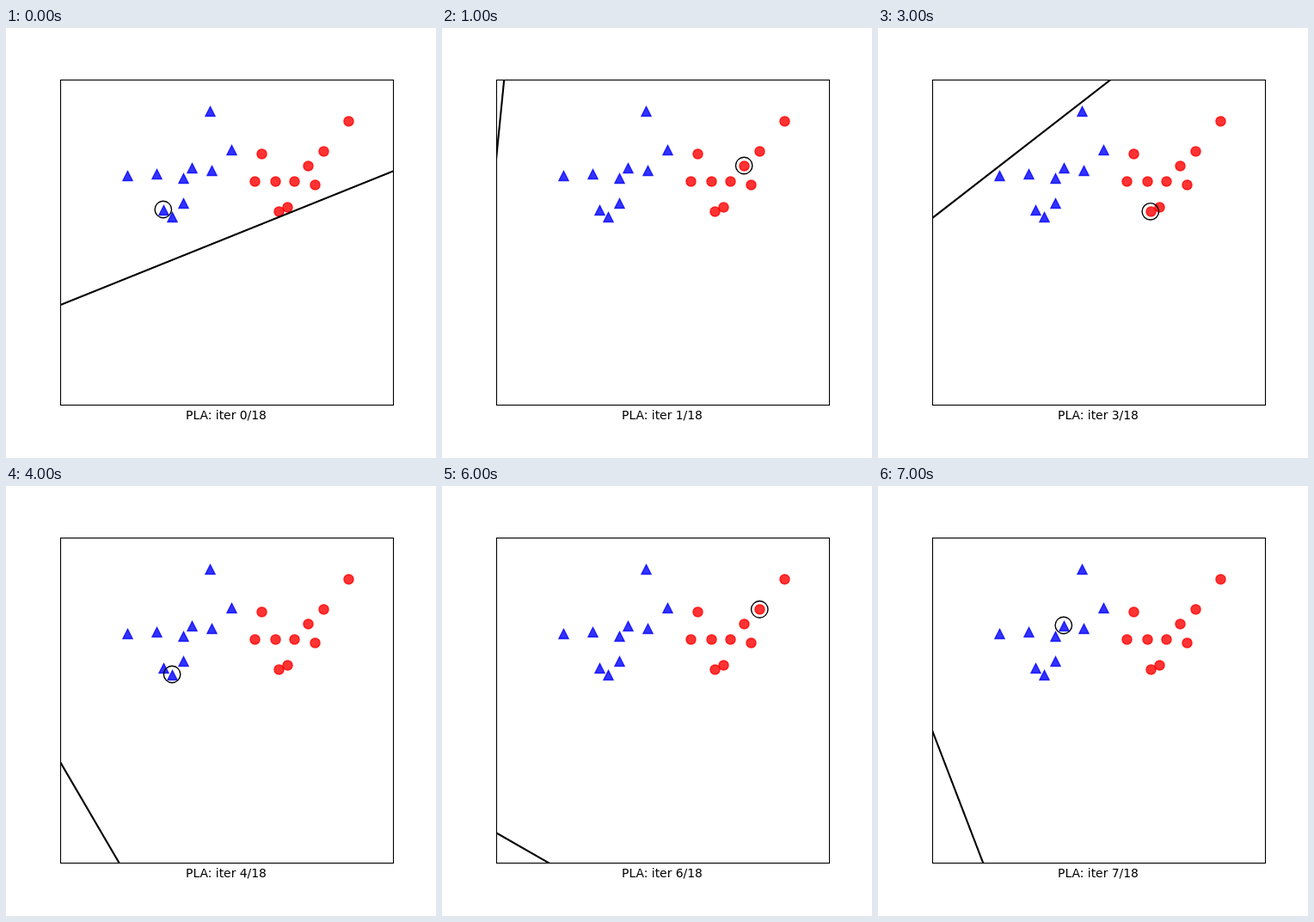
An HTML page for the animation above (8000 ms loop, 500x500 px).

```html
<!DOCTYPE html>
<html lang="en">
<head>
<meta charset="utf-8">
<title>Perceptron steps</title>
<style>
html, body { margin: 0; width: 100%; height: 100%; overflow: hidden; background: #fff; }
svg { display: block; width: 500px; height: 500px; }
text { font: 13.89px "DejaVu Sans", sans-serif; text-anchor: middle; }
</style>
</head>
<body>
<svg viewBox="0 0 500 500">
  <defs>
    <clipPath id="plot"><rect x="63.5" y="60.5" width="387" height="378"/></clipPath>
    <path id="tri" d="M0-5.56L5.56 5.56H-5.56Z" stroke-linejoin="miter"/>
    <circle id="dot" r="5.56"/>
  </defs>
  <g id="blue" fill="#00f" stroke="#00f" stroke-width="1.39" fill-opacity=".8" stroke-opacity=".8"></g>
  <g id="red" fill="#f00" stroke="#f00" stroke-width="1.39" fill-opacity=".8" stroke-opacity=".8"></g>
  <g clip-path="url(#plot)"><line id="edge" stroke="#000" stroke-width="2.08"/></g>
  <circle id="ring" r="9.72" fill="none" stroke="#000" stroke-width="1.39"/>
  <rect x="63.5" y="60.5" width="387" height="378" fill="none" stroke="#000" stroke-width="1.11"/>
  <text id="label" x="256" y="455"></text>
</svg>
<script>
const $ = id => document.getElementById(id);
const STEP = 1000;

const blue = [[237, 97], [262, 142], [216, 163], [239, 166], [175, 170], [141, 172],
  [206, 175], [206, 204], [183, 212], [193, 220]];
const red = [[398, 108], [369, 143], [297, 146], [351, 160], [289, 178], [313, 178],
  [335, 178], [359, 182], [327, 208], [317, 213]];

// boundary where it meets the frame: x1, y1, x2, y2; then the misclassified point
const steps = [
  { line: [63.5, 322, 450.5, 166.3], at: [183, 211] },
  { line: [63.5, 147.5, 72.2, 60.5], at: [351.4, 160] },
  { line: [63.5, 319.8, 241, 438.5], at: [206, 173.5] },
  { line: [63.5, 220.8, 270, 60.5], at: [317, 213.3] },
  { line: [63.5, 321.7, 131.7, 438.5], at: [193.3, 219] },
  { line: [63.5, 238, 140, 438.5], at: [206.5, 203] },
  { line: [63.5, 403.5, 124.5, 438.5], at: [369.5, 143.5] },
  { line: [63.5, 285.5, 122.3, 438.5], at: [216, 162] }
];

function scatter(group, shape, points) {
  $(group).innerHTML = points.map(([x, y]) =>
    `<use href="#${shape}" x="${x + 0.5}" y="${y + 0.5}"/>`).join("");
}

function set(id, attrs) {
  for (const key in attrs) $(id).setAttribute(key, attrs[key]);
}

function show(i) {
  const { line: [x1, y1, x2, y2], at: [cx, cy] } = steps[i];
  const dx = (x2 - x1) * 0.2, dy = (y2 - y1) * 0.2;
  set("edge", { x1: x1 - dx, y1: y1 - dy, x2: x2 + dx, y2: y2 + dy });
  set("ring", { cx: cx - 0.2, cy });
  $("label").textContent = `PLA: iter ${i}/18`;
}

scatter("blue", "tri", blue.map(([x, y]) => [x, y - 0.5]));
scatter("red", "dot", red);

const start = performance.now();
let shown = -1;
function tick() {
  const i = Math.floor((performance.now() - start) / STEP) % steps.length;
  if (i !== shown) show(shown = i);
  requestAnimationFrame(tick);
}
tick();
</script>
</body>
</html>
```
